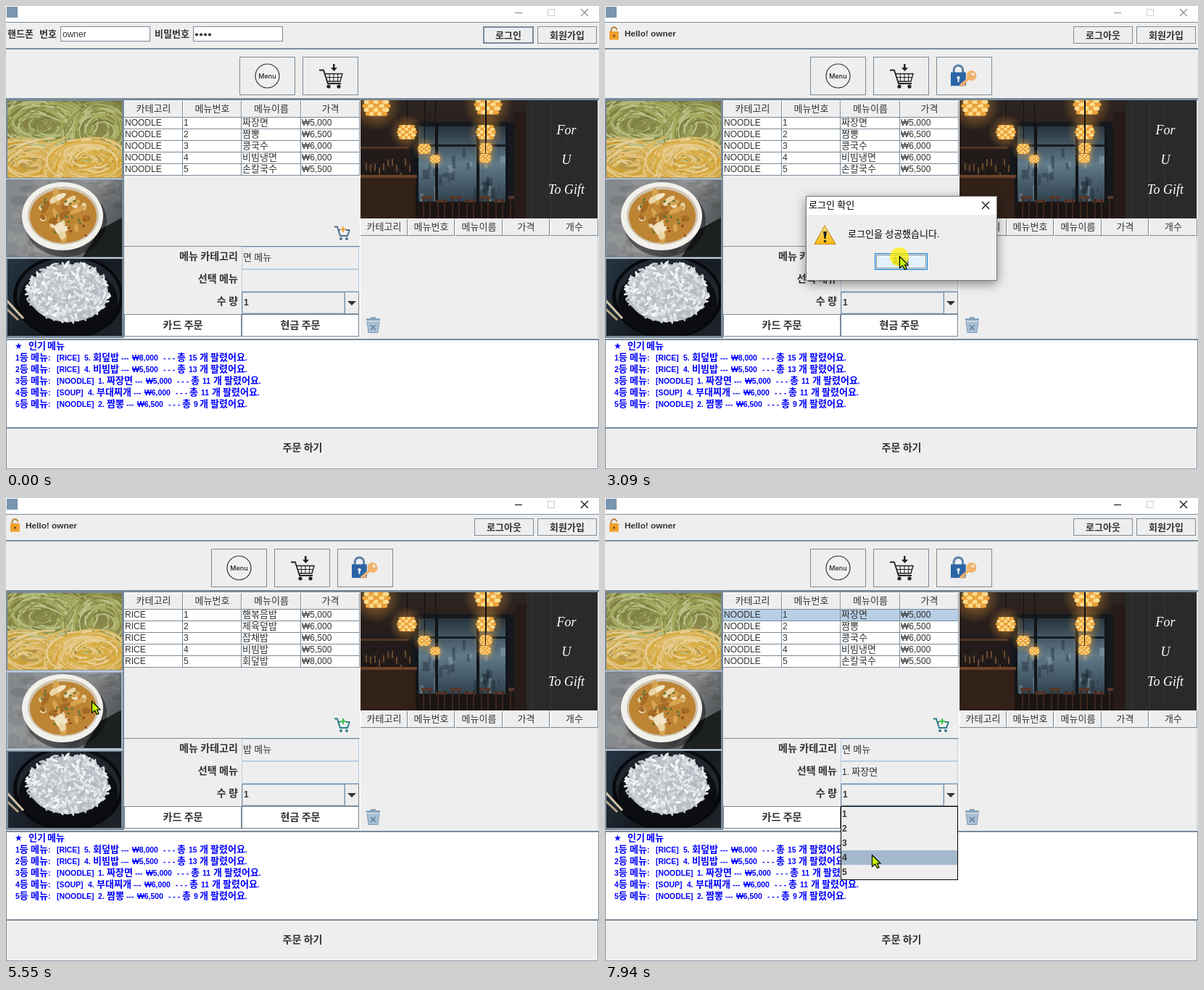
Write an HTML page with a canvas that moves like this. It is 818 by 640 pixels and loops after 8000 ms.

```html
<!DOCTYPE html>
<html lang="ko">
<head>
<meta charset="utf-8">
<title>Menu order</title>
<style>
html, body { margin: 0; width: 100%; height: 100%; overflow: hidden; background: #eee; }
canvas { display: block; }
</style>
</head>
<body>
<canvas id="stage" width="818" height="640"></canvas>
<script>
const LOOP = 8000, LINE = '#7a8a99', BG = '#eee', SEL = '#b8cfe5', INK = '#333';
const stage = document.getElementById('stage');
const back = document.createElement('canvas');
back.width = 818; back.height = 640;
let g = back.getContext('2d');

// ---- helpers ----
let seed = 7;
const rnd = (a = 0, b = 1) => {
  seed = seed * 16807 % 2147483647;
  return a + (b - a) * seed / 2147483647;
};
function rect(x, y, w, h, fill) { g.fillStyle = fill; g.fillRect(x, y, w, h); }
function box(x, y, w, h, fill, edge = LINE, lw = 1) {
  if (fill) rect(x, y, w, h, fill);
  g.strokeStyle = edge; g.lineWidth = lw;
  g.strokeRect(x + lw / 2, y + lw / 2, w - lw, h - lw);
}
function oval(x, y, rx, ry, fill, rot = 0) {
  g.beginPath(); g.ellipse(x, y, rx, ry, rot, 0, 7); g.fillStyle = fill; g.fill();
}
function trace(pts) {
  g.beginPath();
  for (let i = 0; i < pts.length; i += 2) g.lineTo(pts[i], pts[i + 1]);
}
function line(pts, color, lw = 1) {
  trace(pts); g.strokeStyle = color; g.lineWidth = lw; g.stroke();
}
function poly(pts, fill) { trace(pts); g.closePath(); g.fillStyle = fill; g.fill(); }
function dots(x, y, w, h, color) {
  g.setLineDash([1, 1]); box(x, y, w, h, null, color); g.setLineDash([]);
}

// Hangul and Latin runs use separate fonts; align: 0 left, .5 centre, 1 right
function text(s, x, y, { bold, size = 12, latin = 12, color = INK, align = 0 } = {}) {
  const weight = bold ? 'bold ' : '';
  const runs = s.match(/[가-힣]+|[^가-힣]+/g).map(run => {
    const font = weight + (/[가-힣]/.test(run)
      ? size * 13 / 12 + 'px "Noto Sans CJK KR", "Noto Sans CJK JP", sans-serif'
      : latin + 'px "Liberation Sans", Arial, sans-serif');
    g.font = font;
    return { run, font, w: g.measureText(run).width };
  });
  x -= align * runs.reduce((sum, r) => sum + r.w, 0);
  g.fillStyle = color;
  for (const r of runs) { g.font = r.font; g.fillText(r.run, x, y); x += r.w; }
}

// ---- pictures ----
function picture(x, y, w, h, paint) {
  g.save();
  g.beginPath(); g.rect(x, y, w, h); g.clip();
  g.translate(x, y);
  paint(w, h);
  g.restore();
}
function fade(x0, y0, x1, y1, ...colors) {
  const f = g.createLinearGradient(x0, y0, x1, y1);
  colors.forEach((c, i) => f.addColorStop(i / (colors.length - 1), c));
  return f;
}
function strands(n, cx, cy, rx, ry, hue, sat, lo, hi) {
  for (let i = 0; i < n; i++) {
    const k = rnd(.2, 1), a = rnd(0, 6.3);
    g.beginPath();
    g.ellipse(cx + rnd(-9, 9), cy + rnd(-7, 7), rx * k, ry * k, rnd(-.4, .4), a, a + rnd(.7, 2));
    g.strokeStyle = `hsl(${hue} ${sat}% ${rnd(lo, hi)}%)`;
    g.lineWidth = 2.2; g.stroke();
  }
}
function noodles(w, h) {
  rect(0, 0, w, h, fade(0, 0, 0, h, '#7c7843', '#8d8a4b', '#c99f4c'));
  strands(150, 50, 32, 72, 40, 66, 31, 36, 68);
  strands(110, 128, 40, 48, 42, 64, 31, 36, 68);
  strands(130, 34, 86, 56, 30, 42, 62, 48, 76);
  strands(140, 112, 84, 56, 30, 42, 66, 50, 78);
}
function soup(w, h) {
  rect(0, 0, w, h, fade(0, 0, w, h, '#85888b', '#8b8d8f', '#3a3d3f'));
  for (let i = 0; i < 70; i++)
    oval(rnd(0, w), rnd(0, h), rnd(3, 16), rnd(2, 9), rnd() < .5 ? '#ffffff14' : '#00000018');
  poly([104, h, 128, 68, w, 52, w, h], '#1d2021');
  oval(80, 57, 57, 49, '#0006');
  oval(76, 50, 56, 47, '#f2f0eb');
  oval(77, 49, 49, 40, '#cfc3ae');
  oval(77, 50, 46, 37, '#bd8434');
  for (let i = 0; i < 26; i++) {
    const a = rnd(0, 6.3), k = Math.sqrt(rnd()) * .82;
    oval(77 + 46 * k * Math.cos(a), 50 + 37 * k * Math.sin(a), rnd(4, 12), rnd(3, 6),
      ['#e9d5a4', '#d7a552', '#f1e4c4', '#a66c25'][i % 4], rnd(0, 3));
  }
  for (let i = 0; i < 22; i++)
    oval(rnd(44, 110), rnd(24, 78), 2.2, 1.3, i % 3 ? '#5e7135' : '#944b20', rnd(0, 3));
}
function rice(w, h) {
  rect(0, 0, w, h, fade(0, 0, w, h, '#263443', '#151a20', '#20242a'));
  oval(84, 52, 76, 58, '#07090c');
  oval(84, 50, 71, 52, '#20262e');
  oval(84, 58, 68, 49, '#0b0d10');
  oval(84, 47, 55, 40, '#b9bdc2');
  for (let i = 0; i < 480; i++) {
    const a = rnd(0, 6.3), k = Math.sqrt(rnd());
    oval(84 + 57 * k * Math.cos(a), 45 + 41 * k * Math.sin(a), 4, 1.6,
      `hsl(210 12% ${rnd(72, 99)}%)`, rnd(0, 3.2));
  }
  line([-2, 56, 22, 82], '#d3c4a8', 3);
  line([-2, 68, 15, 84], '#b5a486', 3);
}
function lamp(x, y, r) {
  const glow = g.createRadialGradient(x, y, 0, x, y, r * 1.9);
  glow.addColorStop(0, '#f2a43a90'); glow.addColorStop(1, '#f2a43a00');
  oval(x, y, r * 1.9, r * 1.9, glow);
  oval(x, y, r * .9, r * .7, '#b86d18');
  for (let j = -2; j <= 2; j++) for (let i = -2; i <= 2; i++)
    oval(x + i * r * (.42 - Math.abs(j) * .06), y + j * r * .3, r * .25, r * .17,
      (i + j) % 2 ? '#ffdc8a' : '#eca33a');
}
function diner(w, h) {
  rect(0, 0, w, h, fade(0, 0, 0, h, '#30241f', '#211a1a', '#15110f'));
  rect(0, 0, 230, 16, '#2b2421');
  rect(70, 30, 142, 112, '#15191d');
  rect(78, 36, 126, 104, fade(0, 36, 0, 140, '#26333d', '#617a88', '#2f414d'));
  for (let i = 0; i < 30; i++)
    rect(rnd(80, 195), rnd(65, 130), rnd(2, 10), rnd(4, 22), i % 3 ? '#1c2a3466' : '#a9bcc455');
  for (const x of [76, 103, 160, 200]) rect(x, 30, 4, 112, '#11151a');
  rect(70, 61, 142, 3, '#151a1f');
  rect(0, 64, 66, 3, '#4e3526');
  for (let i = 0; i < 22; i++) rect(4 + i * 3, rnd(76, 100), 2, 10, i % 2 ? '#694a30' : '#2d211a');
  rect(0, 104, 76, 59, '#322119');
  rect(0, 103, 78, 4, '#6b4329');
  rect(76, 140, 153, 23, '#1b1513');
  for (let i = 0; i < 7; i++) {
    const x = 84 + i * 20;
    rect(x, 132 + i % 2 * 5, 15, 4, '#57372a');
    rect(x + 2, 136, 2, 27, '#3b271e'); rect(x + 11, 136, 2, 27, '#3b271e');
  }
  rect(212, 16, 17, 147, '#261b18');
  for (const [x, y, r] of [[22, 8, 18], [176, 6, 18], [64, 44, 13], [173, 44, 13],
    [88, 67, 9], [173, 66, 9], [103, 81, 7], [172, 80, 8]]) {
    rect(x, 0, 1, y, '#111'); lamp(x, y, r);
  }
  rect(229, 0, 98, h, '#2a2a2b');
  for (let i = 0; i < 12; i++) rect(229 + rnd(0, 96), 0, 1, h, '#ffffff08');
  g.fillStyle = '#fff'; g.textAlign = 'center';
  g.font = 'italic 18px "Liberation Serif", serif';
  ['For', 'U', 'To Gift'].forEach((s, i) => g.fillText(s, 284, 47 + i * 41));
  g.textAlign = 'left';
}

// ---- fixed parts ----
function header(x, y, w, label) {
  rect(x, y, w, 23, BG);
  rect(x, y, w, 1, '#fff'); rect(x, y, 1, 23, '#fff');
  rect(x, y + 22, w, 1, LINE); rect(x + w - 1, y, 1, 23, LINE);
  text(label, x + w / 2, y + 15, { align: .5 });
}
function button(x, y, w, h, label, opt = {}) {
  box(x, y, w, h, opt.fill || BG, LINE, opt.edge || 1);
  text(label, x + w / 2, y + h / 2 + 4.5, { bold: 1, align: .5, size: opt.size || 12 });
}
const TOP = [
  ['RICE', '5.', '회덮밥', '8,000', 15, 0],
  ['RICE', '4.', '비빔밥', '5,500', 13, 0],
  ['NOODLE', '1.', '짜장면', '5,000', 11, 19],
  ['SOUP', '4.', '부대찌개', '6,000', 11, 5],
  ['NOODLE', '2.', '짬뽕', '6,500', 9, 19]];
function ranking() {
  const put = (s, x, y) => text(s, x, y, { bold: 1, latin: 10.4, color: '#00f' });
  text('★', 12, 473, { color: '#00f', latin: 12 });
  put('인기', 31, 473); put('메뉴', 57, 473);
  TOP.forEach(([cat, no, name, price, sold, dx], i) => {
    const y = 489 + i * 16, end = 123 + dx + name.length * 12;
    const d = sold < 10 ? -7 : 0;
    put(i + 1 + '등', 13, y); put('메뉴:', 34, y); put(`[${cat}]`, 70, y);
    put(no, 108 + dx, y); put(name, 120 + dx, y);
    put('---', end, y); put('₩' + price, end + 15, y); put('- - -', end + 58, y);
    put('총', end + 77, y); put('' + sold, end + 93, y);
    put('개', end + 108 + d, y); put('팔렸어요.', end + 123 + d, y);
  });
}
function trash() {
  rect(497, 431, 19, 3, '#86a3bd'); rect(503, 429, 7, 2, '#86a3bd');
  poly([498, 435, 515, 435, 513, 451, 500, 451], '#a9c0d6');
  line([498, 435, 500, 450.5, 513, 450.5, 515, 435], '#7f9bb4');
  line([503, 440, 510, 447], '#5f7f9e', 1.5); line([510, 440, 503, 447], '#5f7f9e', 1.5);
}
function fixedParts() {
  rect(0, 0, 818, 640, BG);
  rect(0, 0, 818, 22, '#fff');
  rect(1, 1, 15, 15, '#7895b0');
  for (const [y, h] of [[22, 1], [58, 2], [127, 3], [459, 2]]) rect(0, y, 818, h, LINE);
  rect(0, 130, 163, 328, LINE);
  picture(2, 131, 158, 106, noodles);
  picture(2, 240, 158, 106, soup);
  picture(2, 349, 158, 106, rice);
  rect(0, 238, 162, 1, '#dce3ea'); rect(0, 347, 162, 1, '#dce3ea');
  rect(488, 130, 1, 328, '#fff');
  picture(489, 130, 327, 163, diner);
  rect(816, 130, 1, 328, '#c4ccd4');
  [163, 244, 325, 407].forEach((x, i) =>
    header(x, 131, [81, 81, 82, 81][i], ['카테고리', '메뉴번호', '메뉴이름', '가격'][i]));
  ['카테고리', '메뉴번호', '메뉴이름', '가격', '개수'].forEach((s, i) =>
    header(Math.round(489 + i * 65.4), 294, i < 4 ? 65 : 66, s));
  rect(163, 331, 325, 1, LINE);
  ['메뉴 카테고리', '선택 메뉴', '수 량'].forEach((s, i) =>
    text(s, 320, 350 + i * 31, { bold: 1, size: 13, align: 1 }));
  box(325, 332, 162, 31, BG, SEL);
  box(325, 363, 162, 31, BG, SEL);
  box(325, 394, 162, 31, BG, LINE);
  box(326, 395, 141, 29, null, SEL);
  rect(467, 394, 1, 31, LINE);
  poly([471, 407, 483, 407, 477, 413], INK);
  text('1', 328, 413, { bold: 1 });
  button(163, 425, 162, 31, '카드 주문', { fill: '#fff', size: 13 });
  button(325, 425, 162, 31, '현금 주문', { fill: '#fff', size: 13 });
  trash();
  box(0, 460, 818, 122, '#fff');
  ranking();
  box(0, 581, 817, 58, BG, LINE);
  rect(1, 582, 815, 1, LINE);
  text('주문 하기', 409, 614, { bold: 1, size: 13, align: .5 });
}

// ---- changing parts ----
function controls(active) {
  const c = active ? '#000' : '#8a8a8a';
  rect(702, 9, 10, 1, c);
  box(747, 4, 10, 10, null, '#ccc');
  line([793, 4, 803, 14], c, 1.1); line([803, 4, 793, 14], c, 1.1);
}
function padlock(x, y, s, body, shackle, open) {
  g.strokeStyle = shackle; g.lineWidth = 3 * s;
  g.beginPath(); g.arc(x + 10 * s, y + 8 * s, 6 * s, Math.PI, 0);
  if (!open) g.lineTo(x + 16 * s, y + 12 * s);
  g.moveTo(x + 4 * s, y + 8 * s); g.lineTo(x + 4 * s, y + 12 * s);
  g.stroke();
  rect(x, y + 11 * s, 20 * s, 18 * s, body);
}
function iconButton(x) { box(x, 70, 77, 53, BG); }
function toolbar(logged) {
  const x = logged ? 283 : 322, c = x + 130;
  iconButton(x);
  rect(x + 20, 78, 38, 38, '#f0f0f0');
  g.beginPath(); g.arc(x + 38.5, 96.5, 16.5, 0, 7);
  g.strokeStyle = '#333'; g.lineWidth = 1.2; g.stroke();
  g.font = '500 9px Inter, sans-serif'; g.fillStyle = '#222'; g.textAlign = 'center';
  g.fillText('Menu', x + 38.5, 100); g.textAlign = 'left';

  iconButton(x + 87);
  rect(c - 1, 80, 2.5, 6, '#222');
  poly([c - 4, 85, c + 5, 85, c + .5, 90], '#222');
  line([c - 20, 88.5, c - 14, 88.5, c - 8, 107, c + 10, 107], '#222', 1.8);
  line([c - 12, 93.5, c + 12, 93.5, c + 9, 104, c - 9, 104], '#222', 1.4);
  line([c - 11, 98.5, c + 11, 98.5], '#222');
  for (const d of [-6, 0, 6]) line([c + d, 93, c + d * .9, 104], '#222');
  oval(c - 7, 111, 2.6, 2.6, '#222'); oval(c + 7, 111, 2.6, 2.6, '#222');

  if (!logged) return;
  iconButton(457);
  padlock(477, 80, 1.04, '#2b64a5', '#5f83a8');
  oval(487.5, 99, 2.2, 2.2, '#e8eef5'); rect(486.5, 100, 2, 5, '#e8eef5');
  line([490, 110, 504, 98], '#f3b36b', 3.5);
  line([494, 107, 497, 110], '#f3b36b', 2.5);
  oval(505.5, 96, 7, 7, '#f3b36b'); oval(507.5, 94, 2, 2, BG);
}
function loginBar(logged) {
  if (logged) {
    padlock(6, 28, .64, '#f0a02c', '#b9802c', true);
    oval(12.5, 41, 1.5, 1.5, '#6b4310');
    text('Hello! owner', 27, 42, { bold: 1, latin: 11.8 });
    button(646, 28, 82, 24, '로그아웃');
  } else {
    text('핸드폰', 2, 43, { bold: 1 }); text('번호', 46, 43, { bold: 1 });
    box(75, 28, 124, 21, '#fff');
    text('owner', 78, 43);
    text('비밀번호', 205, 43, { bold: 1 });
    box(258, 28, 124, 21, '#fff');
    for (let i = 0; i < 4; i++) oval(263 + i * 6, 39.5, 2.1, 2.1, INK);
    button(658, 28, 70, 24, '로그인', { edge: 2 });
  }
  button(733, 28, 82, 24, '회원가입');
}
const MENU = {
  NOODLE: ['짜장면 5,000', '짬뽕 6,500', '콩국수 6,000', '비빔냉면 6,000', '손칼국수 5,500'],
  RICE: ['햄볶음밥 5,000', '제육덮밥 6,000', '잡채밥 6,500', '비빔밥 5,500', '회덮밥 8,000']
};
function table(cat, row, focus) {
  MENU[cat].forEach((item, i) => {
    const y = 154 + i * 16, [name, price] = item.split(' ');
    rect(163, y, 325, 16, i === row ? SEL : '#fff');
    rect(163, y + 15, 325, 1, LINE);
    [cat, '' + (i + 1), name, '₩' + price].forEach((s, k) => {
      text(s, [164, 245, 326, 408][k], y + 11);
      rect([243, 324, 406, 487][k], y, 1, 16, LINE);
    });
    if (i === row && focus) dots(244, y, 80, 15, '#6a4a20');
  });
  text(cat === 'RICE' ? '밥 메뉴' : '면 메뉴', 327, 351);
  if (row >= 0) text(`${row + 1}. ${MENU[cat][row].split(' ')[0]}`, 327, 382);
}
function addCart(logged) {
  const c = logged ? '#2c7f86' : '#4d6f91', plus = logged ? '#3cc04a' : '#eda23a';
  line([453, 304.5, 457, 304.5, 461, 317, 471, 317, 474, 309], c, 2);
  line([458, 309, 461, 309], c, 2); line([469, 309, 474, 309], c, 2);
  rect(464, 304, 2, 8, plus); rect(461, 307, 8, 2, plus);
  oval(462, 321, 2, 2, c); oval(470, 321, 2, 2, c);
}
function dialog() {
  g.save();
  g.shadowColor = 'rgba(0,0,0,.45)'; g.shadowBlur = 14; g.shadowOffsetY = 4;
  rect(277, 262, 264, 117, '#777');
  g.restore();
  rect(278, 263, 262, 115, BG);
  rect(278, 263, 262, 25, '#fff');
  text('로그인 확인', 281, 279, { color: '#000' });
  line([520, 270, 530, 280], '#000', 1.1); line([530, 270, 520, 280], '#000', 1.1);
  poly([303, 302, 319, 329, 288, 329], '#c08a1c');
  poly([303, 304, 317, 328, 290, 328], fade(0, 303, 0, 328, '#ffe680', '#fcb813'));
  poly([301, 311, 306, 311, 304.5, 321, 302.5, 321], '#222');
  oval(303.5, 324.5, 1.8, 1.8, '#222');
  text('로그인을 성공했습니다.', 335, 319, { color: '#000' });
  box(372, 341, 73, 23, '#e5f1fb', '#0078d7');
  dots(374, 343, 69, 19, '#222');
  text('확인', 408, 357, { align: .5 });
}
function popup(pick) {
  box(325, 425, 162, 102, BG, '#000');
  for (let i = 0; i < 5; i++) {
    const y = 426 + i * 20;
    if (i === pick) rect(326, y, 160, 20, '#a3b8cc');
    text('' + (i + 1), 327, y + 14, { bold: 1 });
  }
}

// ---- pointer ----
// bursts of movement: start, end, steps
const BURSTS = [[530, 1220, 10], [1450, 1530, 2], [2080, 2860, 11], [2930, 3160, 4],
  [3480, 4250, 11], [4330, 5090, 11], [5170, 5710, 8], [5860, 6630, 11],
  [6710, 7470, 11], [7550, 7940, 6]];
// time, x, y
const PATH = [[530, 640, 618], [1220, 702, 32], [1450, 697, 37], [1530, 694, 42],
  [2160, 694, 42], [2860, 398, 352], [2930, 403, 348], [3006, 406, 345], [3160, 406, 345],
  [3480, 402, 355], [3710, 370, 401], [4250, 267, 184], [4406, 270, 184], [4482, 270, 184],
  [4940, 85, 395], [5090, 80, 400], [5170, 82, 396], [5555, 118, 280], [5710, 110, 195],
  [5860, 108, 190], [6240, 262, 162], [6320, 266, 164], [6630, 435, 336], [6710, 440, 345],
  [7090, 472, 408], [7170, 472, 408], [7470, 450, 432], [7550, 440, 437], [7940, 368, 492]];
const CLICKS = [[2080, 2165], [3005, 3160], [4165, 4250], [4930, 5010], [5860, 5935],
  [6240, 6320], [7090, 7170]];

function stepTime(t) {
  let q = 0;
  for (const [a, b, n] of BURSTS) {
    if (t < a) break;
    const d = (b - a) / (n - 1);
    q = Math.min(b, a + Math.floor((t - a) / d + .1) * d);
  }
  return q;
}
function pointerAt(q) {
  const i = PATH.findIndex(p => p[0] > q);
  if (i < 0) return PATH[PATH.length - 1].slice(1);
  if (i === 0) return [-99, -99];
  const [a, x, y] = PATH[i - 1], [b, u, v] = PATH[i], k = (q - a) / (b - a);
  return [x + (u - x) * k, y + (v - y) * k].map(Math.round);
}
function pointer(x, y) {
  g.save();
  g.translate(x + .5, y + .5);
  poly([0, 0, 0, 16, 4, 12.5, 7, 18, 9.5, 17, 7, 11.5, 11.5, 11.5], '#c6ff00');
  g.strokeStyle = '#000'; g.lineWidth = 1.2; g.stroke();
  g.restore();
}

function draw(t) {
  const logged = t >= 2236, asking = logged && t < 3160;
  const cat = t >= 4938 && t < 5860 ? 'RICE' : 'NOODLE';
  const row = t >= 4250 && t < 4938 ? 1 : t >= 6245 ? 0 : -1;
  const [x, y] = pointerAt(stepTime(t));
  const over = (l, top, w, h) => x >= l && x < l + w && y >= top && y < top + h;

  g.drawImage(back, 0, 0);
  controls(t >= 1220 && !asking);
  loginBar(logged);
  toolbar(logged);
  table(cat, row, t < 7090);
  addCart(logged);
  for (const top of [131, 240, 349])
    if (over(1, top, 160, 107)) box(1, top - 1, 160, 108, null, '#a3b8cc', 2);
  if (cat === 'RICE') box(2, 349, 158, 107, null, LINE);
  if (over(1, 582, 816, 57)) box(1, 583, 815, 55, null, SEL, 2);
  if (asking) dialog();
  if (t >= 7090) popup(over(326, 426, 160, 100) ? Math.floor((y - 426) / 20) : 0);
  if (CLICKS.some(([a, b]) => t >= a && t < b)) oval(x, y + 1, 13, 13, 'rgba(255,240,0,.75)');
  pointer(x, y);
}

fixedParts();
g = stage.getContext('2d');
function frame() {
  draw(performance.now() % LOOP);
  requestAnimationFrame(frame);
}
frame();
</script>
</body>
</html>
```
